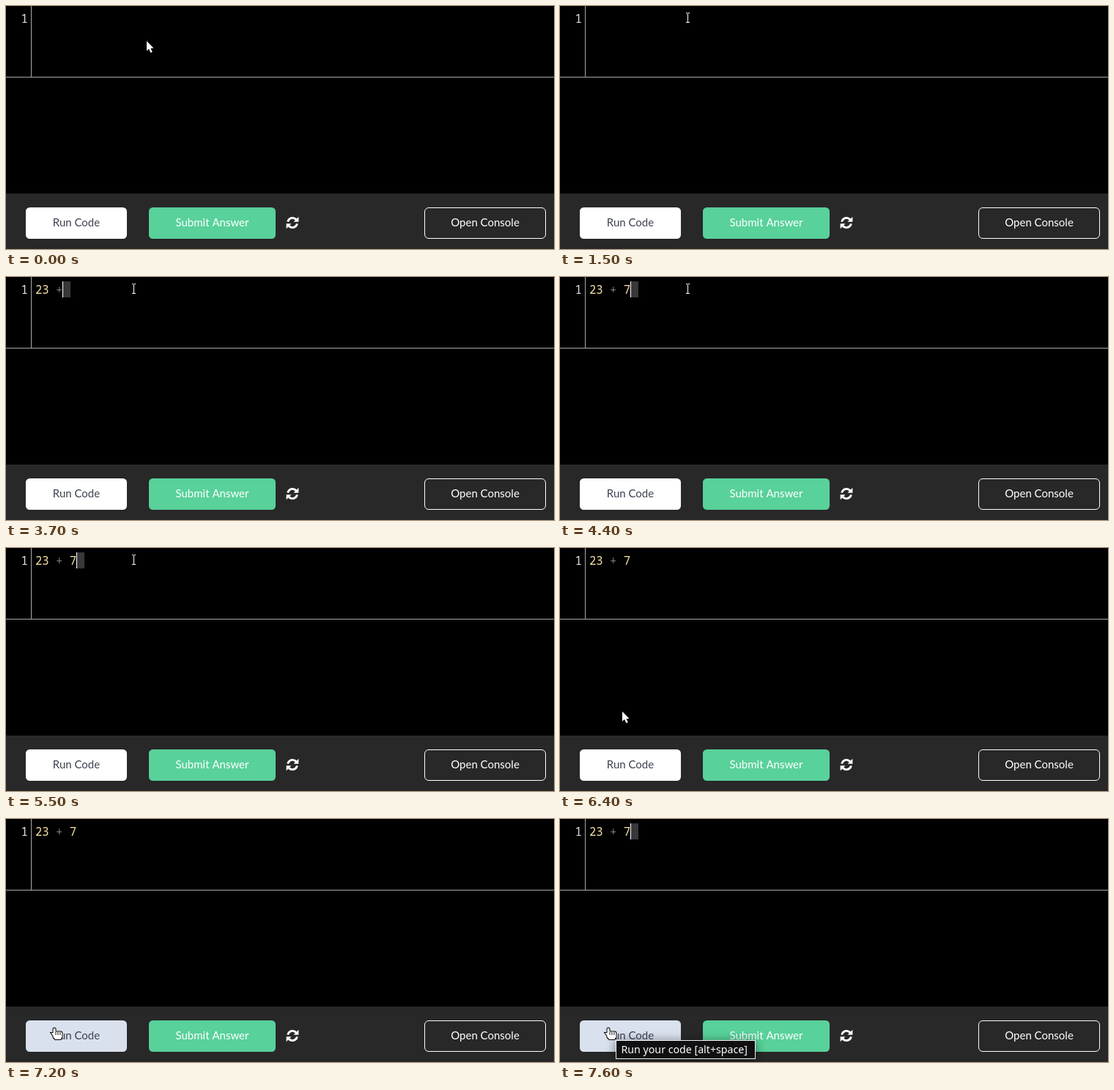
An HTML page with a canvas for the animation above (8000 ms loop, 748 by 333 pixels).

```html
<!DOCTYPE html>
<html lang="en">
<head>
<meta charset="utf-8">
<title>Code editor</title>
<style>
  html, body { margin: 0; width: 100%; height: 100%; overflow: hidden; background: #000; }
  canvas { display: block; width: 748px; height: 333px; }
</style>
</head>
<body>
<canvas id="stage" width="748" height="333"></canvas>
<script>
const ctx = document.getElementById('stage').getContext('2d');
const LOOP = 8000, STEP = 100, BLINK = 533;
const UI = '15px Lato, sans-serif';
const MONO = '500 15.6px "Noto Sans Mono", monospace';
const TIP = '500 14.2px "Noto Sans", sans-serif';
const CODE = '23 + 7', CODE_X = 40, CHAR = 9.36;
const FIRST_BLINK = 960;
const keyTimes = [2290, 2560, 3180, 3680, 4000, 4400];
const HOVER = 6600, TIP_SHOWN = 7300;

const progress = (t, from, to) => Math.min(1, Math.max(0, (t - from) / (to - from)));
const lerp = (a, b, k) => a + (b - a) * k;

function bezier(a, b, c, d, u) {
  const v = 1 - u;
  return v * v * v * a + 3 * v * v * u * b + 3 * v * u * u * c + u * u * u * d;
}

// Up into the code line, rest there, then sweep down to the run button
function pointerAt(t) {
  const enter = progress(t, 0, 300);
  const leave = 1 - (1 - progress(t, 5600, 6900)) ** 1.69;
  const x = leave ? bezier(174, 235, 71, 66, leave) : lerp(192, 174, enter);
  const y = leave ? bezier(16, 60, 187, 286, leave) : lerp(48, 16, enter);
  return [Math.round(x), Math.round(y)];
}

function rect(x, y, w, h, color) {
  ctx.fillStyle = color;
  ctx.fillRect(x, y, w, h);
}

function text(str, x, y, font, color, align = 'left') {
  ctx.font = font;
  ctx.fillStyle = color;
  ctx.textAlign = align;
  ctx.fillText(str, x, y);
}

function poly(points, fill, stroke) {
  ctx.beginPath();
  points.forEach(([x, y]) => ctx.lineTo(x, y));
  ctx.closePath();
  if (stroke) {
    ctx.strokeStyle = stroke;
    ctx.lineWidth = 1.5;
    ctx.stroke();
  }
  ctx.fillStyle = fill;
  ctx.fill();
}

function button(label, x, w, color, fill, border) {
  const inset = border ? 0.5 : 0;
  ctx.beginPath();
  ctx.roundRect(x + inset, 276 + inset, w - 2 * inset, 43 - 2 * inset, 5.5);
  if (fill) {
    ctx.fillStyle = fill;
    ctx.fill();
  }
  if (border) {
    ctx.strokeStyle = border;
    ctx.lineWidth = 1;
    ctx.stroke();
  }
  text(label, x + w / 2, 302, UI, color, 'center');
}

function refreshIcon() {
  ctx.save();
  ctx.translate(391, 297);
  for (let i = 0; i < 2; i++) {
    ctx.beginPath();
    ctx.arc(0, 0, 6.6, Math.PI * 1.07, Math.PI * 1.8);
    ctx.strokeStyle = '#fff';
    ctx.lineWidth = 2.9;
    ctx.stroke();
    poly([[8.4, -8.2], [8.4, -1.3], [1.5, -1.3]], '#fff');
    ctx.rotate(Math.PI);
  }
  ctx.restore();
}

function arrow() {
  poly([[0, 0], [0, 13.5], [3, 10.8], [5.4, 16], [7.8, 15], [5.5, 10], [9.5, 9.8]], '#fff', '#000');
}

function beam() {
  rect(0, -6, 1, 13, '#fff');
  for (const y of [-7, 6]) {
    rect(-2, y, 2, 1, '#fff');
    rect(1, y, 2, 1, '#fff');
  }
}

function hand() {
  ctx.beginPath();
  ctx.roundRect(-1.5, 0.5, 3, 11, 1.5);
  ctx.roundRect(-1.5, 5.5, 12, 9, 2);
  ctx.roundRect(0.5, 11, 8.5, 5, 1);
  ctx.moveTo(-4.5, 7);
  ctx.lineTo(-2, 7);
  ctx.lineTo(2, 11);
  ctx.lineTo(1, 15);
  ctx.closePath();
  ctx.strokeStyle = '#000';
  ctx.lineWidth = 2;
  ctx.stroke();
  ctx.fillStyle = '#fff';
  ctx.fill();
  for (let i = 0; i < 3; i++) rect(1.5 + i * 3, 6, 0.9, 4, '#000');
}

function caretVisible(t) {
  const last = keyTimes.findLast(at => at <= t) ?? FIRST_BLINK;
  return t >= last && Math.floor((t - last) / BLINK) % 2 === 0;
}

function editor(t) {
  rect(34, 0, 1, 97, '#aaa');
  rect(0, 97, 748, 1, '#aaa');
  text('1', 20.6, 23, MONO, '#e4e4e4');

  const count = keyTimes.filter(at => at <= t).length;
  if (caretVisible(t)) {
    const left = Math.round(CODE_X + count * CHAR);
    const right = Math.round(CODE_X + 10.5 + count * CHAR);
    rect(left, 6, right - left, 22, '#38383b');
    rect(left, 6, 1, 22, '#fff');
  }
  for (let i = 0; i < count; i++) {
    text(CODE[i], CODE_X + i * CHAR, 23, MONO, CODE[i] === '+' ? '#7c7c7c' : '#f8e2a8');
  }
}

function toolbar(t) {
  rect(0, 257, 748, 76, '#282828');
  const k = progress(t, HOVER, HOVER + 300);
  const runFill = `rgb(${lerp(255, 217, k)}, ${lerp(255, 224, k)}, ${lerp(255, 238, k)})`;
  button('Run Code', 27, 138, '#3d4251', runFill);
  button('Submit Answer', 195, 173, '#fff', '#58d19a');
  button('Open Console', 571, 166, '#fff', null, '#fff');
  refreshIcon();
}

function tooltip() {
  ctx.save();
  ctx.shadowColor = 'rgba(0, 0, 0, 0.5)';
  ctx.shadowBlur = 14;
  ctx.shadowOffsetY = 2;
  rect(76, 303, 191, 26, '#f4f4f4');
  ctx.restore();
  rect(77, 304, 189, 24, '#100f11');
  text('Run your code [alt+space]', 83.5, 321, TIP, '#fff');
}

function pointer(t) {
  ctx.save();
  ctx.translate(...pointerAt(t));
  if (t > HOVER) hand();
  else if (t >= 300 && t < 5800) beam();
  else arrow();
  ctx.restore();
}

function draw(t) {
  rect(0, 0, 748, 333, '#000');
  editor(t);
  toolbar(t);
  if (t >= TIP_SHOWN) tooltip();
  pointer(t);
}

const start = performance.now();
function tick() {
  const t = (performance.now() - start) % LOOP;
  draw(Math.floor(t / STEP) * STEP);
  requestAnimationFrame(tick);
}
tick();
</script>
</body>
</html>
```
